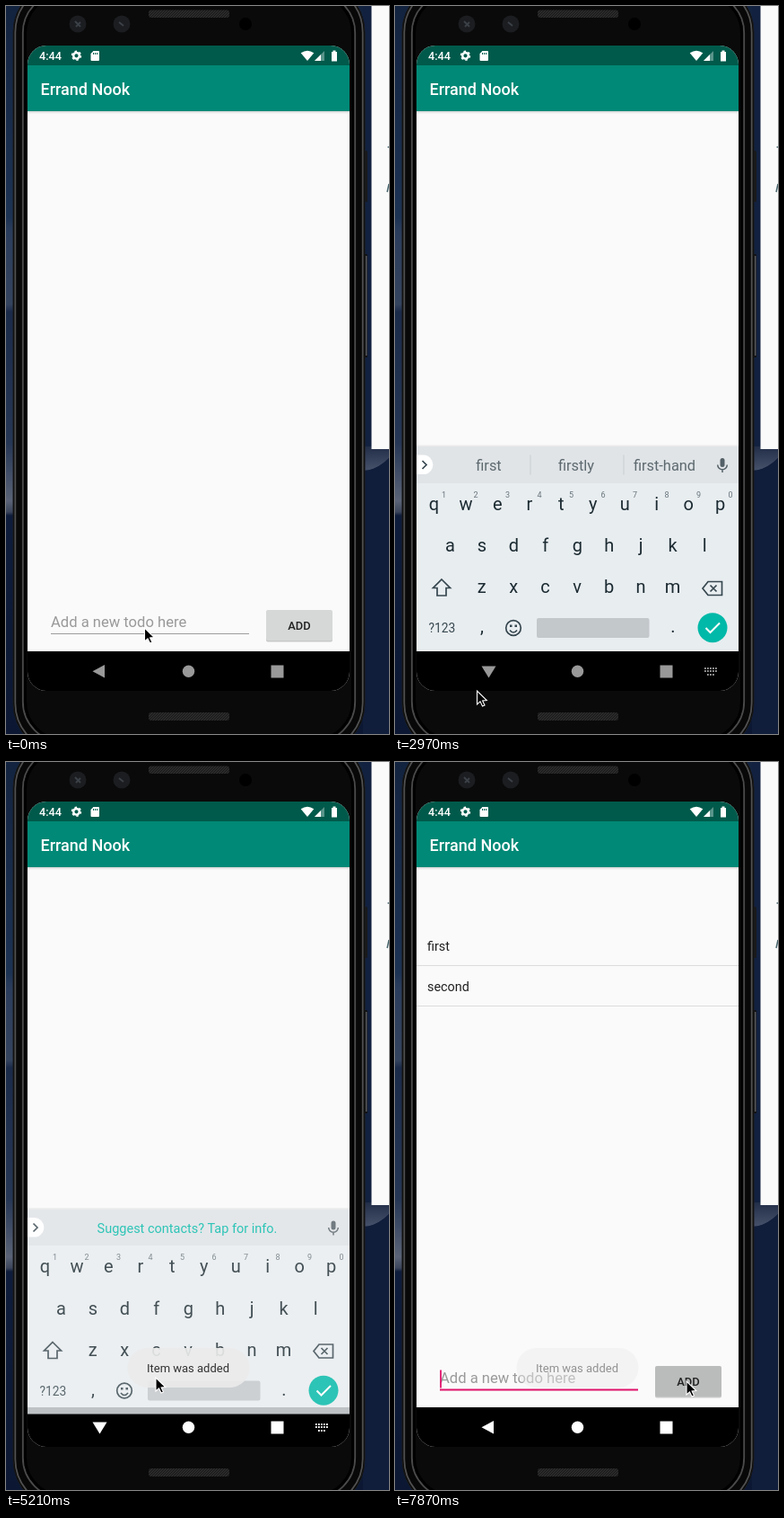
Recreate the animation shown at these times as an HTML page. Size 427x810 px, loop 8 s.

```html
<!DOCTYPE html>
<html lang="en">
<head>
<meta charset="utf-8">
<title>Todo app</title>
<style>
html, body { margin: 0; width: 100%; height: 100%; overflow: hidden; background: #0e1c3b; }
svg { display: block; width: 427px; height: 810px; font-family: Roboto, sans-serif; }
.mid { text-anchor: middle; }
.line { fill: none; stroke: #37474f; stroke-width: 1.7; }
</style>
</head>
<body>
<svg viewBox="0 0 427 810">
  <defs>
    <linearGradient id="sky" x2="0" y2="1">
      <stop offset="0" stop-color="#12233f"/><stop offset=".29" stop-color="#1d3354"/>
      <stop offset=".31" stop-color="#2b3d5c"/><stop offset=".41" stop-color="#34445f"/>
      <stop offset=".42" stop-color="#1a2a49"/><stop offset=".6" stop-color="#263755"/>
      <stop offset=".68" stop-color="#5a6377"/><stop offset=".695" stop-color="#3c465c"/>
      <stop offset=".7" stop-color="#0e1c3b"/><stop offset="1" stop-color="#0c1833"/>
    </linearGradient>
    <linearGradient id="dune" x2="0" y2="1">
      <stop offset="0" stop-color="#222e48"/><stop offset="1" stop-color="#46516a"/>
    </linearGradient>
    <linearGradient id="shade" x2="0" y2="1">
      <stop offset="0" stop-opacity=".16"/><stop offset="1" stop-opacity="0"/>
    </linearGradient>
    <pattern id="mesh" width="3" height="3" patternUnits="userSpaceOnUse">
      <rect width="3" height="3" fill="#2b2b2b"/><path d="M0 3L3 0" stroke="#181818"/>
    </pattern>
    <clipPath id="screen"><rect x="24" y="44" width="359" height="718" rx="21"/></clipPath>
  </defs>

  <rect width="427" height="810" fill="url(#sky)"/>
  <path d="M398 0h29v810h-29z" fill="#122140"/>
  <path d="M398 490h29v13q-14 14-29 14z" fill="url(#dune)"/>
  <path d="M398 517q15 0 29-14v307h-29z" fill="#101d3b"/>
  <path d="M407.500 0H427v493h-19.500z" fill="#fafafa"/>
  <path d="M425.500 157h2M425 207l2-9" stroke="#45636b" stroke-width="1.500"/>

  <rect x="398" y="161" width="5" height="57" rx="1.500" fill="#191a1c"/>
  <rect x="398" y="276" width="5" height="115" rx="1.500" fill="#111"/>
  <path d="M401.800 278v111" stroke="#777a80"/>
  <g fill="#080808">
    <rect x="8" y="-27" width="392" height="859" rx="56" stroke="#1a1a1a"/>
    <rect x="10.300" y="-24.500" width="387.400" height="854" rx="54" stroke="#505050" stroke-width="1.800"/>
    <rect x="18.800" y="-15" width="370.400" height="834" rx="45" fill="#0a0a0a" stroke="#4a4a4a" stroke-width="1.800"/>
    <rect x="21.500" y="-12" width="365" height="828" rx="42" fill="#0a0a0a" stroke="#000" stroke-width="3"/>
  </g>
  <rect x="159" y="4.500" width="90" height="8.500" rx="3" fill="url(#mesh)"/>
  <rect x="159" y="786" width="90" height="9" rx="3" fill="url(#mesh)"/>
  <g fill="#1b1d20">
    <circle cx="80" cy="20" r="9.500"/><circle cx="129" cy="20" r="9.500"/>
    <circle cx="267" cy="20" r="7" fill="#000"/>
  </g>
  <path d="M77 17l6 6M78 23l5-5M126 18l5 4" stroke="#3b4047" stroke-width="2"/>

  <g clip-path="url(#screen)">
    <path d="M24 44h359v718H24z" fill="#fafafa"/>
    <path d="M24 44h359v22H24z" fill="#005a4b"/>
    <path d="M24 66h359v51H24z" fill="#008976"/>
    <path d="M24 117h359v3H24z" fill="url(#shade)"/>
    <g fill="#fff">
      <text x="37" y="59.500" font-size="12.700" font-weight="500">4:44</text>
      <text x="38.500" y="98.500" font-size="18" font-weight="500">Errand Nook</text>
      <circle cx="78.500" cy="55.300" r="3.300" fill="none" stroke="#fff" stroke-width="2.400"/>
      <circle cx="78.500" cy="55.300" r="4.900" fill="none" stroke="#fff" stroke-width="1.600" stroke-dasharray="2.500 2.630"/>
      <path d="M97.500 50H103q1 0 1 1v9q0 1-1 1h-7.500q-1 0-1-1v-7z"/>
      <path d="M97.500 52v2M99.500 52v2M101.500 52v2" stroke="#005a4b"/>
      <path d="M328.700 52.300q7.300-5.300 14.600 0L336 61z"/>
      <path d="M355 50v11h-11z" opacity=".35"/><path d="M351 54v7h-7z"/>
      <path d="M363 51h1.500v-1.500h3V51h1.500v10.500h-6z"/>
    </g>

    <g id="body">
      <g id="items" font-size="14.400" fill="#212121"></g>
      <text id="field" x="50" y="691" font-size="16.600"></text>
      <path id="rule" d="M50 698.500h221"/>
      <path id="caret" d="M51 676.500v20" stroke="#e0126b" stroke-width="1.800"/>
      <rect x="290" y="673.500" width="74" height="34" rx="2" fill="#000" opacity=".2"/>
      <rect id="add" x="290" y="672" width="74" height="34" rx="2"/>
      <text class="mid" x="327" y="694" font-size="12.900" font-weight="500" fill="#222">ADD</text>
    </g>

    <path d="M24 718h359v44H24z"/>
    <g id="board">
      <path d="M24 488.500h359v2H24z" fill="#000" opacity=".06"/>
      <path d="M24 490h359v41H24z" fill="#e0e4e7"/>
      <path d="M24 531h359v187H24z" fill="#e8edf0"/>
      <path d="M24 499.500h7.500a10.800 10.800 0 0 1 0 21.600H24z" fill="#fff"/>
      <path class="line" d="M30.500 506l4.500 4.500-4.500 4.500"/>
      <rect x="362.500" y="503" width="5" height="10" rx="2.500" fill="#546067"/>
      <path d="M359.700 510.500a5.300 5.300 0 0 0 10.600 0M365 516v3" fill="none" stroke="#546067" stroke-width="1.500"/>
      <g id="words" class="mid"></g>
      <g id="keys" class="mid" font-size="20" fill="#1c2b32"></g>
      <path class="line" d="M52 638l9.500 9.500h-4.500v8.500h-10v-8.500h-4.500z"/>
      <path class="line" d="M349 640.500h15.500v15H349l-6-7.500zM351.500 644.500l7 7M358.500 644.500l-7 7"/>
      <text x="37.500" y="697" font-size="13.800" fill="#37474f">?123</text>
      <circle class="line" cx="132" cy="692" r="8.300"/>
      <path class="line" d="M128 694.500q4 5 8 0"/>
      <path d="M128 688.500h2.500v2.500H128zM133.500 688.500h2.500v2.500h-2.500z" fill="#37474f"/>
      <rect x="158" y="681" width="125.500" height="22" rx="2" fill="#c3c8cb"/>
      <circle cx="354" cy="691.700" r="16.500" fill="#00b9a8"/>
      <path d="M346.500 692l5 5 10.500-10.500" fill="none" stroke="#fff" stroke-width="2"/>
    </g>

    <rect id="ripple" x="60" y="718" width="88" height="44" rx="22" fill="#444"/>
    <g id="nav">
      <path id="back" d="M96.500 740.300L110 733v14.600z"/>
      <path id="down" d="M96.500 734.500h16l-8 13z"/>
      <circle cx="203.500" cy="740.300" r="6.700"/>
      <path d="M295.500 733.500h14v14h-14z"/>
      <path id="ime" d="M345 737h14M345 740h14M348 744h8" fill="none" stroke-width="1.800" stroke-dasharray="1.800 1.200"/>
    </g>
    <g id="toast">
      <rect x="135.500" y="652" width="136" height="44" rx="22" fill="#ebebeb" opacity=".9"/>
      <text class="mid" x="203" y="679" font-size="13" fill="#333">Item was added</text>
    </g>
  </g>
  <path id="mouse" d="M0 0v15l3.500-3.200L6 17l2.500-1.100-2.400-5 4.700-.3z" stroke="#fff" stroke-width="1.100"/>
</svg>
<script>
const $ = id => document.getElementById(id);
const set = (id, attrs) => { for (const k in attrs) $(id).setAttribute(k, attrs[k]); };
const show = (id, on) => set(id, { opacity: +on });
const text = (x, y, s, more = '') => `<text x="${x}" y="${y}" ${more}>${s}</text>`;

const row = (chars, x, y) => [...chars].map((c, i) => text(x + 35.45 * i, y, c)).join('');
$('keys').innerHTML = row('qwertyuiop', 43.5, 560.5) + row('asdfghjkl', 61.5, 607) +
  row('zxcvbnm', 96.7, 653) + text(97, 697, ',') + text(310, 697, '.') +
  [...'1234567890'].map((c, i) => text(54.5 + 35.5 * i, 546.5, c, 'font-size="9" fill="#68757c"')).join('');

const tip = ['Suggest contacts? Tap for info.'];
const start = { at: [154.5, 692], kb: null, body: true, typed: '', items: [], words: tip,
  focus: false, caret: false, press: false, ripple: 0, toast: 0, lit: false };

// Each step changes part of the state at a given time (ms).
const steps = [
  [150, { at: [152, 694] }],
  [295, { at: [140, 689] }],
  [440, { at: [129.5, 683] }],
  [880, { focus: true, caret: true }],
  [1030, { kb: [7.5, .82], body: false }],
  [1180, { kb: [0, 1] }],
  [2380, { words: ['for', 'from', 'free'] }],
  [2530, { words: ['find', 'first', 'fine'] }],
  [2680, { words: ['first', 'fire', 'firm'], at: [112, 720] }],
  [2830, { words: ['first', 'firstly', 'first-hand'], at: [88, 776] }],
  [2970, { at: [91.5, 762] }],
  [3120, { at: [100, 746] }],
  [3270, { at: [102, 744], kb: [24.5, .57], body: true, typed: 'first', words: [], ripple: .6, lit: true }],
  [3420, { kb: null, ripple: .25 }],
  [3570, { at: [125, 737], ripple: 0 }],
  [3720, { at: [190, 722] }],
  [3870, { at: [270, 702] }],
  [4020, { at: [325, 689] }],
  [4160, { press: true }],
  [4310, { typed: '', items: ['first'], toast: .3 }],
  [4460, { toast: 1, press: false, at: [300, 692] }],
  [4610, { at: [170, 692] }],
  [4760, { at: [167, 685], caret: false }],
  [5210, { kb: [7.5, .82], body: false, words: tip }],
  [5360, { kb: [0, 1] }],
  [5800, { words: ['so', 'she', 'some'] }],
  [5950, { words: ['see', 'send', 'set'] }],
  [6100, { words: ['second', 'sec', 'section'] }],
  [6250, { words: ['second', 'seconds', 'secondary'], toast: .5 }],
  [6390, { toast: 0, at: [150, 705] }],
  [6540, { at: [118, 732] }],
  [6690, { at: [102, 744] }],
  [6840, { kb: [24.5, .57], body: true, typed: 'second', caret: true, words: [], ripple: .6 }],
  [6980, { kb: null, ripple: .25 }],
  [7130, { at: [120, 739], ripple: 0 }],
  [7280, { at: [200, 718] }],
  [7430, { at: [290, 696] }],
  [7580, { at: [325, 689] }],
  [7720, { press: true }],
  [7870, { typed: '', items: ['first', 'second'], toast: .52 }]
];

function suggestions(words) {
  if (words.length === 1) return text(202, 516, words[0], 'font-size="14.500" fill="#00b9a8"');
  return words.map((w, i) => text([104.5, 202, 300.5][i], 517, w, 'font-size="16.400" fill="#5d696f"')).join('') +
    (words.length ? '<path d="M151 499.500v22M255 499.500v22" stroke="#c8ced1"/>' : '');
}

function draw(s) {
  set('mouse', { transform: `translate(${s.at})` });
  show('body', s.body);
  $('items').innerHTML = s.items.map((name, i) => text(36, 209.5 + 45 * i, name) +
    `<path d="M24 ${226.5 + 45 * i}h359" stroke="#dcdcdc"/>`).join('');
  $('field').textContent = s.typed || 'Add a new todo here';
  set('field', { fill: s.typed ? '#212121' : '#999' });
  set('rule', { stroke: s.focus ? '#e0126b' : '#9c9c9c', 'stroke-width': s.focus ? 2 : 1.2 });
  const end = s.typed ? $('field').getComputedTextLength() : 0;
  set('caret', { transform: `translate(${end})`, opacity: +s.caret });
  set('add', { fill: s.press ? '#babcbb' : '#d6d8d7' });
  const [drop, alpha] = s.kb || [0, 0];
  set('board', { transform: `translate(0 ${drop})`, opacity: alpha });
  $('words').innerHTML = suggestions(s.words);
  const tint = s.lit ? '#fff' : '#999';
  set('nav', { fill: tint });
  set('ime', { stroke: tint });
  show('back', s.body);
  show('down', !s.body);
  show('ime', !s.body);
  show('ripple', s.ripple);
  show('toast', s.toast);
}

const t0 = performance.now();
let last = -1;
function tick(now) {
  const t = Math.max(0, now - t0) % 8000;
  const past = steps.filter(([time]) => time <= t);
  if (past.length !== last) {
    last = past.length;
    draw(Object.assign({}, start, ...past.map(step => step[1])));
  }
  requestAnimationFrame(tick);
}
tick(t0);
</script>
</body>
</html>
```
